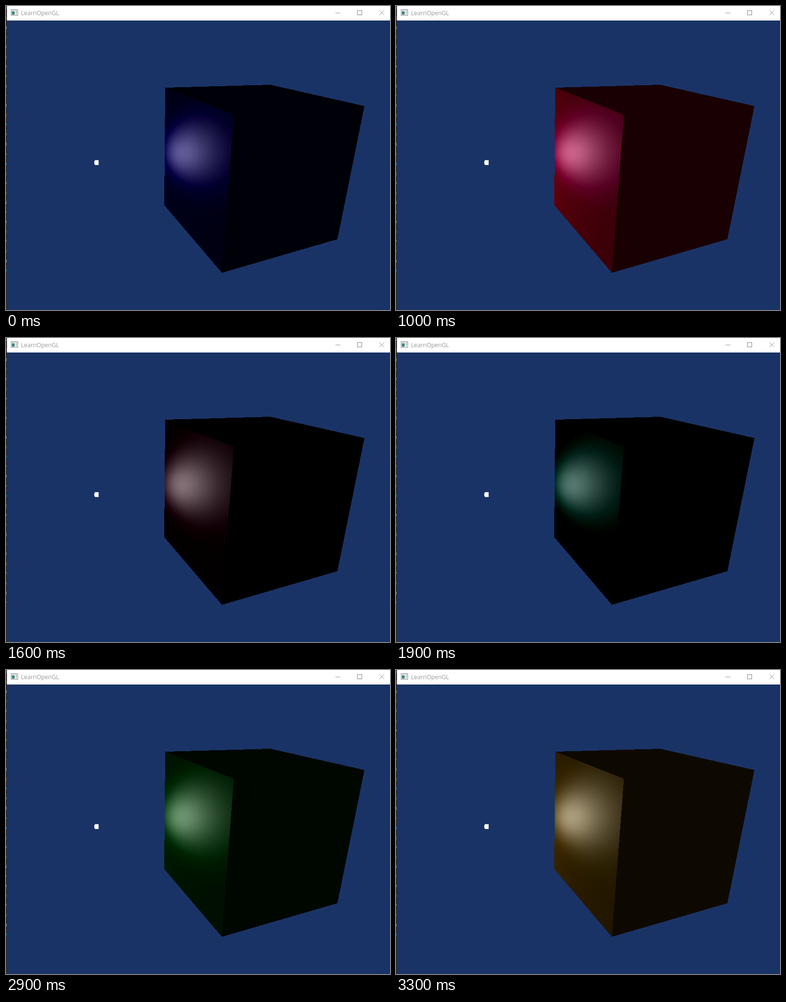
Write an HTML page with a canvas that moves like this. It is 796 px wide and 629 px high and loops after 3.4 s.

```html
<!DOCTYPE html>
<html lang="en">
<head>
<meta charset="utf-8">
<title>LearnOpenGL</title>
<style>
  html, body { margin: 0; width: 100%; height: 100%; overflow: hidden; background: #1a3366; }
  svg, canvas { position: absolute; display: block; }
  svg { left: 0; top: 0; }
  text { font: 12.2px "Open Sans", "Noto Sans", sans-serif; fill: #999; }
</style>
</head>
<body>
<svg width="796" height="629" viewBox="0 0 796 629" shape-rendering="crispEdges">
  <rect width="796" height="629" fill="#1a3366"/>
  <rect x="2" width="794" height="30" fill="#fff"/>
  <g id="strip"><rect width="2" height="629" fill="#2b2b2d"/></g>
  <g id="icon">
    <rect x="10.5" y="7.5" width="14" height="12" fill="#fff" stroke="#8c9196"/>
    <rect x="11" y="8" width="13" height="2" fill="#d3d8dc"/>
    <rect x="12" y="11" width="6" height="7" fill="#3f8580"/>
    <rect x="20" y="11" width="3" height="3" fill="#a9b0b5"/>
    <rect x="20" y="15" width="3" height="3" fill="#c8cdd0"/>
  </g>
  <text x="31" y="19">LearnOpenGL</text>
  <g fill="none" stroke="#999">
    <path d="M683 14.5h10"/>
    <rect x="728.5" y="9.5" width="9" height="9" stroke="#858585"/>
    <path d="M774 9l10 10M784 9l-10 10" shape-rendering="auto"/>
  </g>
  <path d="M184 319h8v10h-8v-2h-1v-6h1z" fill="#fff"/>
</svg>
<canvas id="cube"></canvas>
<script>
const LOOP = 3400, STEP = 100;
const BOX = { x: 326, y: 161, w: 420, h: 394 };

// Projected corners of the cube
const A = [330, 169], B = [472.5, 225], C = [447.5, 552], D = [328, 412];
const E = [743, 207], F = [687, 482.5], G = [548, 163];
const SIDE = [A, B, C, D], OUTLINE = [A, G, E, F, C, D];

// Camera space, in pixels of focal length; y points down
const CENTER = [402, 330], FOCAL = 728;
const NORMAL = [-0.8943, 0.1191, -0.4316];
const CORNER = [70, -105, FOCAL];
const LAMP = [-380, -10.6, 1286];
const SHININESS = 32;
const MATERIAL = [1, 0.5, 0.31];
const RATES = [2, 0.7, 1.3];

const dot = (a, b) => a[0] * b[0] + a[1] * b[1] + a[2] * b[2];
const scale = (a, k) => a.map(v => v * k);
const sub = (a, b) => a.map((v, i) => v - b[i]);
const unit = a => scale(a, 1 / Math.sqrt(dot(a, a)));

function inside(poly, x, y) {
  return poly.every((p, i) => {
    const q = poly[(i + 1) % poly.length];
    return (q[0] - p[0]) * (y - p[1]) - (q[1] - p[1]) * (x - p[0]) >= 0;
  });
}

// Diffuse and specular strength where the ray through (x, y) meets the lit side
function shade(x, y) {
  const ray = [x - CENTER[0], y - CENTER[1], FOCAL];
  const point = scale(ray, dot(CORNER, NORMAL) / dot(ray, NORMAL));
  const toLamp = unit(sub(LAMP, point));
  const facing = dot(NORMAL, toLamp);
  const mirrored = sub(scale(NORMAL, 2 * facing), toLamp);
  const glare = Math.max(0, -dot(unit(ray), mirrored));
  return [Math.max(0, facing), Math.pow(glare, SHININESS)];
}

const canvas = document.getElementById("cube");
canvas.width = BOX.w;
canvas.height = BOX.h;
canvas.style.left = BOX.x + "px";
canvas.style.top = BOX.y + "px";
const ctx = canvas.getContext("2d");
const image = ctx.createImageData(BOX.w, BOX.h);
const pixels = [];

for (let row = 0; row < BOX.h; row++) {
  for (let col = 0; col < BOX.w; col++) {
    const x = BOX.x + col + 0.5, y = BOX.y + row + 0.5;
    const lit = inside(SIDE, x, y);
    if (!lit && !inside(OUTLINE, x, y)) continue;
    const at = 4 * (row * BOX.w + col);
    const [diffuse, specular] = lit ? shade(x, y) : [0, 0];
    pixels.push({ at, body: 255 * (0.1 + 0.5 * diffuse), shine: 127.5 * specular });
    image.data[at + 3] = 255;
  }
}

// Slivers of the window behind the left edge
function drawStrip() {
  const strip = document.getElementById("strip");
  const speck = (y, h, color) => {
    const r = document.createElementNS("http://www.w3.org/2000/svg", "rect");
    const attrs = { x: 0, y, width: 1, height: h, fill: color };
    for (const key in attrs) r.setAttribute(key, attrs[key]);
    strip.append(r);
  };
  const tints = ["#8d8d8d", "#77736a", "#a0a0a0", "#806a50"];
  for (let i = 0; i < 28; i++) {
    const blue = i === 12 || i === 16 || i === 27;
    speck(2 + i * 20.1, 4 + i % 3, blue ? "#3f8fc0" : tints[i % 4]);
  }
}

function draw(ms) {
  let t = Math.floor(ms / STEP) * STEP;
  if (t === 2300 || t === 2500) t -= STEP; // brief holds
  const clock = 5 * Math.PI + 1.11 * (t / 1000 - 0.2);
  const [r, g, b] = RATES.map((rate, i) => MATERIAL[i] * Math.sin(rate * clock));
  const data = image.data;
  for (const p of pixels) {
    data[p.at] = r * p.body + p.shine;
    data[p.at + 1] = g * p.body + p.shine;
    data[p.at + 2] = b * p.body + p.shine;
  }
  ctx.putImageData(image, 0, 0);
}

drawStrip();
const start = performance.now();
let last = -1;
function tick() {
  const ms = (performance.now() - start) % LOOP;
  const step = Math.floor(ms / STEP);
  if (step !== last) draw(ms);
  last = step;
  requestAnimationFrame(tick);
}
tick();
</script>
</body>
</html>
```
